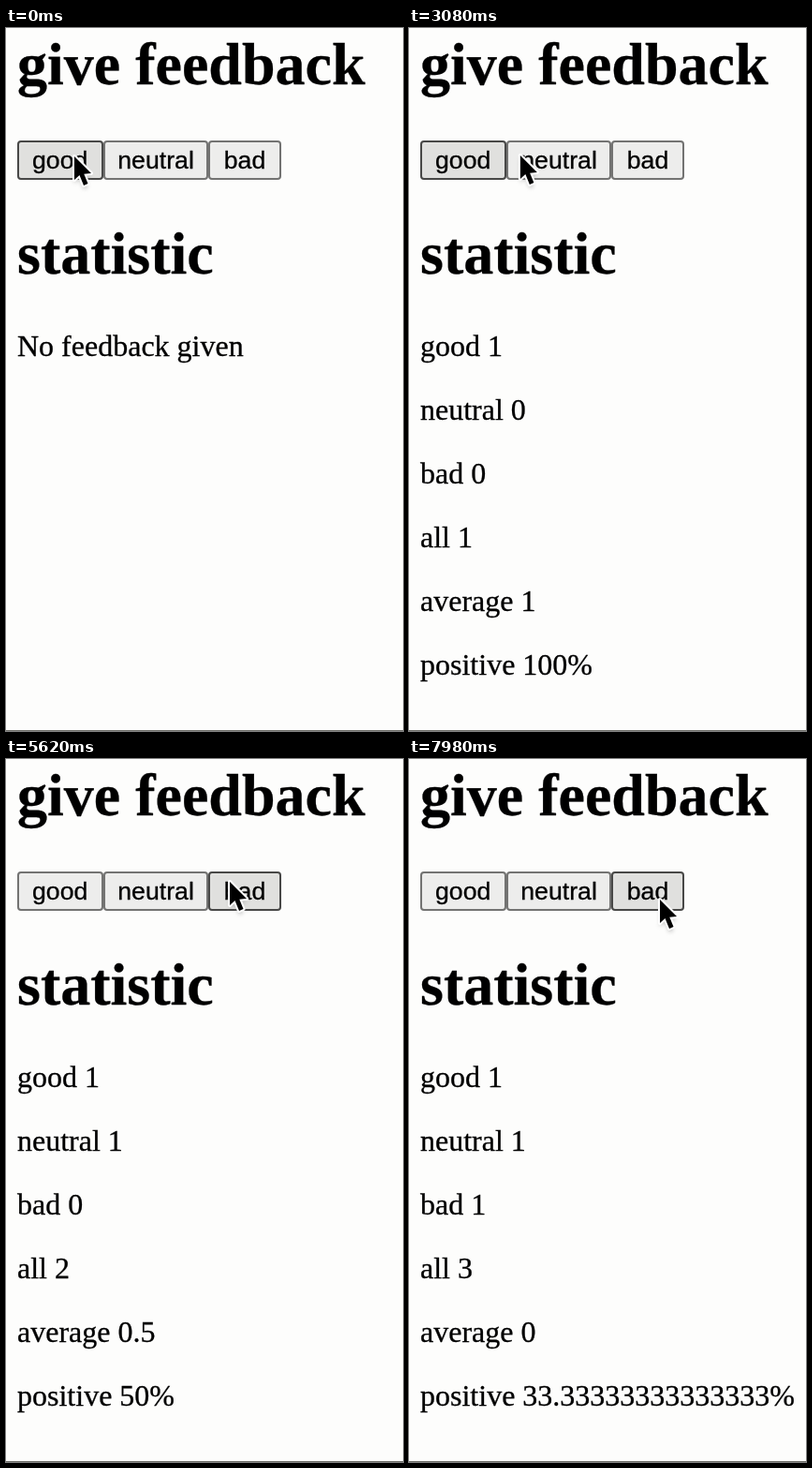
Write an HTML page that moves like this. It is 424 px wide and 750 px high and loops after 8000 ms.

```html
<!DOCTYPE html>
<html lang="en">
<head>
<meta charset="utf-8">
<title>give feedback</title>
<style>
  html, body { margin: 0; width: 100%; height: 100%; overflow: hidden; background: #fdfdfc; }
  svg { display: block; width: 424px; height: 750px; }
  text { font: 32px "Liberation Serif", Times, serif; white-space: pre; stroke: #000; stroke-width: .3px; }
  .title { font-size: 64px; font-weight: bold; }
  .label { font: 26.667px "Liberation Sans", Arial, sans-serif; }
</style>
</head>
<body>
<svg viewBox="0 0 424 750">
  <defs>
    <filter id="soft" x="-50%" y="-50%" width="200%" height="200%">
      <feGaussianBlur stdDeviation="2"/>
    </filter>
    <path id="arrow" d="M0 0V25L5.5 20L10 31L14.5 29L10.3 18.8L18 18Z"/>
  </defs>
  <rect width="424" height="750" fill="#fdfdfc"/>
  <text class="title" x="12" y="60">give feedback</text>
  <g id="buttons"></g>
  <text class="title" x="12" y="262">statistic</text>
  <g id="rows"></g>
  <rect y="749" width="424" height="1" fill="#6f6f6a"/>
  <g id="cursor">
    <use href="#arrow" y="4" fill="#888" opacity=".5" filter="url(#soft)"/>
    <use href="#arrow" fill="#000" stroke="#fff" stroke-width="4" stroke-linejoin="round"
         style="paint-order:stroke"/>
  </g>
</svg>
<script>
const LOOP = 8000;
const STYLES = {
  idle:   { fill: '#ededec', stroke: '#737372' },
  hover:  { fill: '#e0e0de', stroke: '#484847' },
  active: { fill: '#f4f4f3', stroke: '#8d8d8c' }
};
const BUTTONS = [
  { name: 'good',    x: 12,  right: 104, textX: 28 },
  { name: 'neutral', x: 104, right: 216, textX: 119.3 },
  { name: 'bad',     x: 216, right: 294, textX: 232.8 }
];
const HOVERS = [[0, 'good'], [3100, 'neutral'], [5540, 'bad']];
const CLICKS = [
  { name: 'good',    down: 400,  up: 720 },
  { name: 'neutral', down: 3760, up: 4080 },
  { name: 'bad',     down: 6800, up: 7160 }
];
const MOVES = [
  { start: 2660, end: 3460, from: [73, 137],  to: [158, 135] },
  { start: 5200, end: 5620, from: [158, 135], to: [239, 131] },
  { start: 5620, end: 5980, from: [239, 131], to: [268, 150] }
];

const byId = id => document.getElementById(id);

function add(parent, tag, attrs, content = '') {
  const node = document.createElementNS('http://www.w3.org/2000/svg', tag);
  for (const key in attrs) node.setAttribute(key, attrs[key]);
  node.textContent = content;
  return parent.appendChild(node);
}

for (const b of BUTTONS) {
  b.box = add(byId('buttons'), 'rect', {
    x: b.x + 1, y: 121, width: b.right - b.x - 2, height: 40, rx: 3, 'stroke-width': 2
  });
  add(byId('buttons'), 'text', { class: 'label', x: b.textX, y: 150 }, b.name);
}
const rows = Array.from({ length: 6 }, (_, i) =>
  add(byId('rows'), 'text', { x: 12, y: 350 + 68 * i }));

function cursorAt(t) {
  let pos = MOVES[0].from;
  for (const { start, end, from, to } of MOVES) {
    if (t < start) break;
    const p = Math.min(1, (t - start) / (end - start));
    const eased = p * p * (3 - 2 * p);
    pos = from.map((v, i) => v + (to[i] - v) * eased);
  }
  return pos;
}

function statistics(t) {
  const count = name => CLICKS.filter(c => c.name === name && t >= c.up).length;
  const good = count('good'), neutral = count('neutral'), bad = count('bad');
  const all = good + neutral + bad;
  if (!all) return ['No feedback given'];
  return [
    `good ${good}`, `neutral ${neutral}`, `bad ${bad}`, `all ${all}`,
    `average ${(good - bad) / all}`, `positive ${good / all * 100}%`
  ];
}

function render(t) {
  const hovered = HOVERS.filter(([start]) => t >= start).pop()[1];
  const pressed = CLICKS.find(c => t >= c.down && t < c.up);
  for (const b of BUTTONS) {
    const state = pressed && pressed.name === b.name ? 'active'
      : hovered === b.name ? 'hover' : 'idle';
    b.box.setAttribute('fill', STYLES[state].fill);
    b.box.setAttribute('stroke', STYLES[state].stroke);
  }
  const lines = statistics(t);
  rows.forEach((row, i) => { row.textContent = lines[i] || ''; });
  byId('cursor').setAttribute('transform', `translate(${cursorAt(t)})`);
}

const began = performance.now();
function tick() {
  render((performance.now() - began) % LOOP);
  requestAnimationFrame(tick);
}
tick();
</script>
</body>
</html>
```
